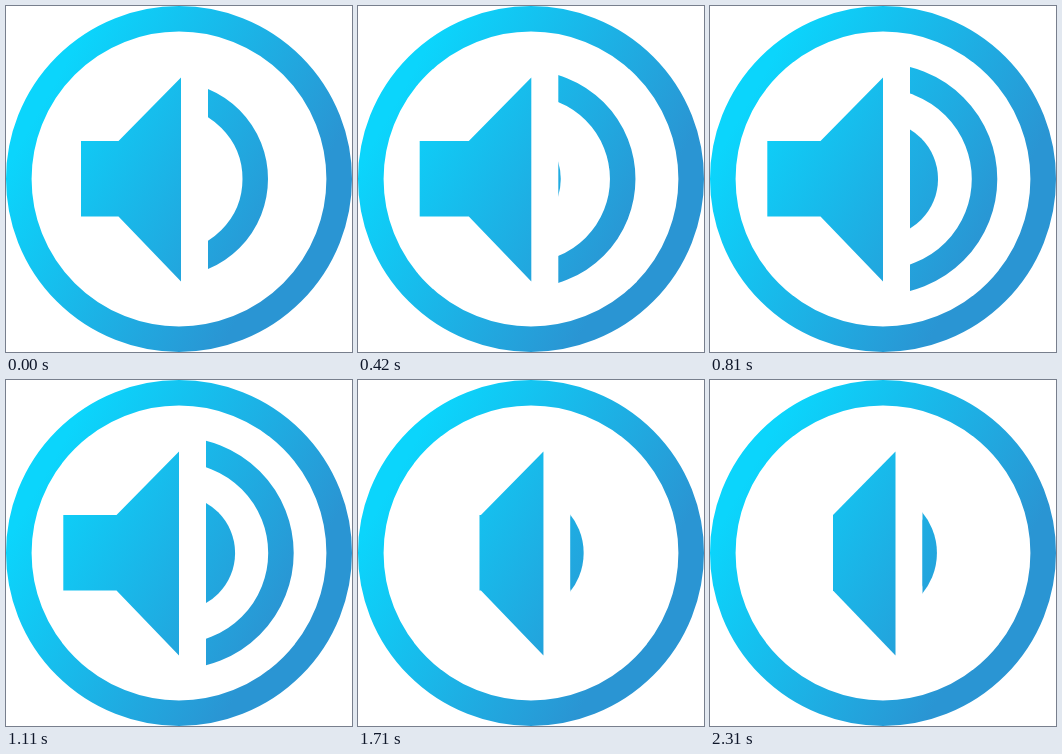
An HTML page that plays this animation: 346 by 346 pixels, repeating every 2440 ms.

```html
<!DOCTYPE html>
<html lang="en">
<head>
<meta charset="utf-8">
<title>Volume icon</title>
<style>
  html, body { margin: 0; width: 100%; height: 100%; overflow: hidden; background: #fff; }
  svg { display: block; width: 100vw; height: 100vh; }
</style>
</head>
<body>
<svg viewBox="0 0 346 346">
  <defs>
    <linearGradient id="blue" gradientUnits="userSpaceOnUse" x1="30" y1="110" x2="270" y2="245">
      <stop offset="0" stop-color="#0bd5fc"/>
      <stop offset="1" stop-color="#2a95d3"/>
    </linearGradient>
    <clipPath id="side"><rect id="edge" y="0" width="346" height="346"/></clipPath>
  </defs>
  <circle cx="173" cy="173" r="160.2" fill="none" stroke="url(#blue)" stroke-width="25.6"/>
  <path id="speaker" fill="url(#blue)"/>
  <g clip-path="url(#side)">
    <circle id="ring" cy="173" fill="none" stroke="url(#blue)" stroke-width="25.5"/>
    <circle id="disk" cy="173" fill="url(#blue)"/>
  </g>
</svg>
<script>
const LOOP = 2440, STEP = 30, BAND = 25.5;
const [speaker, edge, ring, disk] =
  ['speaker', 'edge', 'ring', 'disk'].map(id => document.getElementById(id));

// Ease-out along cubic-bezier(.16, 1, .3, 1), solved by bisection.
function ease(x) {
  if (x <= 0) return 0;
  if (x >= 1) return 1;
  let lo = 0, hi = 1;
  for (let i = 0; i < 24; i++) {
    const u = (lo + hi) / 2, v = 1 - u;
    if (0.48 * u * v * v + 0.9 * u * u * v + u * u * u < x) lo = u; else hi = u;
  }
  return 1 - (1 - lo) ** 3;
}

function draw(ms) {
  const t = Math.min(Math.floor(ms / STEP) * STEP, 2310);
  const closing = t >= 1395;
  const since = t - (closing ? 1395 : 300);

  // Values for medium, loud and quiet; each move has its own duration and delay.
  const move = (medium, loud, quiet, openTime, closeTime, delay = 0) => closing
    ? loud + (quiet - loud) * ease((since - delay) / closeTime)
    : medium + (loud - medium) * ease(since / openTime);

  const left = move(75, 57.3, 123, 600, 600);
  const right = move(175, 173, 185.5, 450, 450);
  const neck = right - 62.5;
  speaker.setAttribute('d',
    `M${left} 135H${neck}L${right} 71.5V275.5L${neck} 210.5H${left}Z`);
  edge.setAttribute('x', right + 27);

  const outer = move(97.5, 115.7, 62, 900, 600, 30);
  ring.setAttribute('cx', move(164.5, 172, 160, 900, 450));
  ring.setAttribute('r', outer - BAND / 2);
  disk.setAttribute('cx', move(105.5, 171.6, 163.5, 900, 450));
  disk.setAttribute('r', move(57.5, 57.5, 63.5, 900, 1500));
}

const start = performance.now();
function tick() {
  draw((performance.now() - start) % LOOP);
  requestAnimationFrame(tick);
}
draw(0);
requestAnimationFrame(tick);
</script>
</body>
</html>
```
